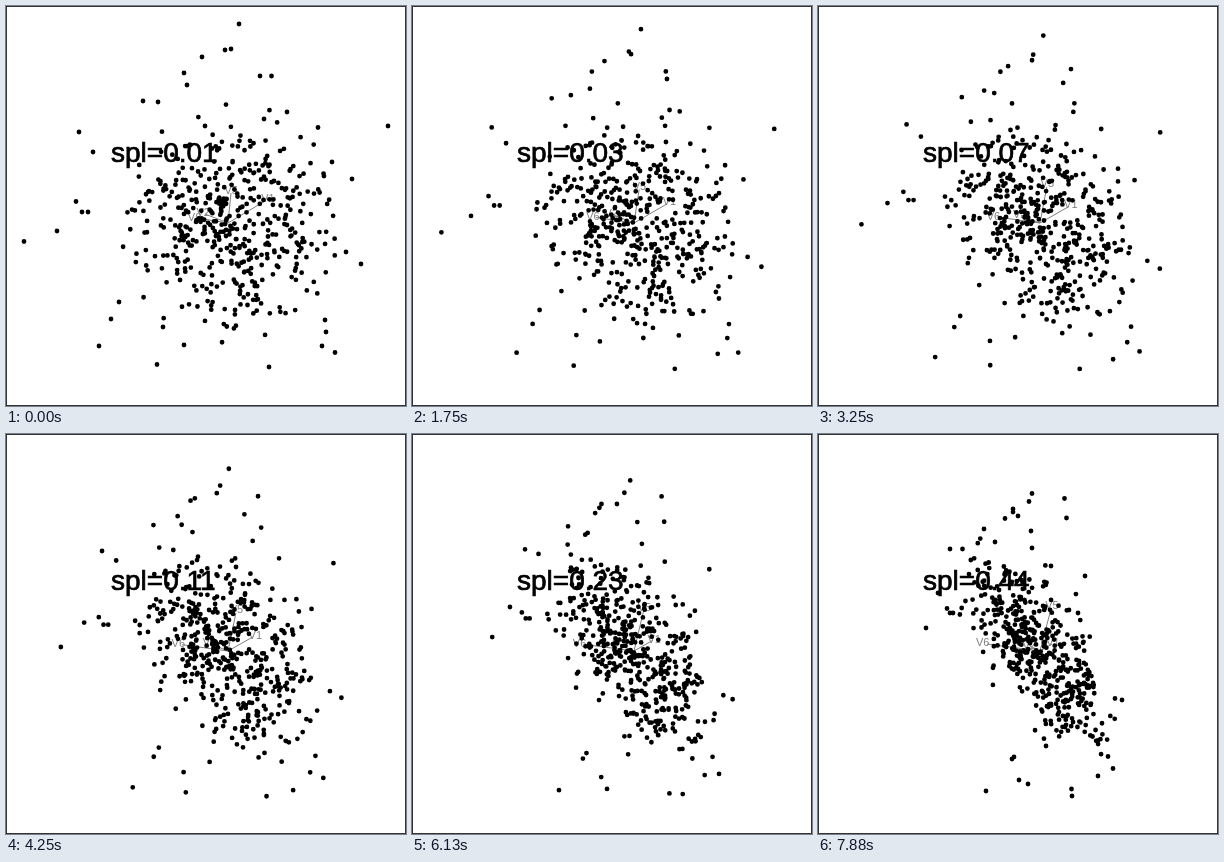
Write an HTML page with a canvas that moves like this. It is 400 by 400 pixels and loops after 8 s.

```html
<!DOCTYPE html>
<html lang="en">
<head>
<meta charset="utf-8">
<title>Projection tour</title>
<style>
html, body { margin: 0; width: 100%; height: 100%; overflow: hidden; background: #fff; }
canvas { display: block; width: 400px; height: 400px; }
</style>
</head>
<body>
<canvas id="stage" width="400" height="400"></canvas>
<script>
const ctx = document.getElementById('stage').getContext('2d');
const LOOP = 8000, STEP = 125, LAST = 63;
const CX = 222, CY = 217;
const TURN_X = 0.75, TURN_Y = 0.5;

// Outlying points: start x, y, end x, y.
const outer = [
  [233, 18, 214, 59.5], [382, 120, 267, 142], [18, 235.5, 108, 194],
  [73, 126, 132, 115], [87, 146, 144.5, 115], [51, 225, 120, 159],
  [70, 195.5, 129, 174.5], [76, 206, 132, 179], [82, 206, 135, 179],
  [93, 340, 168, 357], [151, 358.5, 210, 350], [105, 313, 194, 325],
  [113, 296, 196, 323], [196, 51, 187, 84.5], [178, 67, 195, 75],
  [181, 79, 177, 108], [219, 44, 211, 67.5], [225, 43, 200, 82],
  [254, 70, 246.5, 64.5], [265.5, 70, 213, 97], [137, 95, 166, 95],
  [152, 96, 195, 78], [281, 106, 214, 114], [258, 113, 248.5, 84],
  [312, 121.5, 233, 132], [326, 156, 251, 176], [346, 173, 260, 179],
  [355, 258, 304, 266], [340, 246, 297, 264.5], [329, 346.5, 295, 334.5],
  [316, 340, 254, 362], [263, 361, 253.5, 355], [320, 326, 280, 342],
  [319, 314, 290, 322.5], [178, 339, 228, 312], [157, 321, 201, 346]
];

const axes = [
  ['V5', 225, 187, 233, 175],
  ['V1', 259, 195, 234, 210],
  ['V6', 191, 212, 169, 210],
  ['V2', 199, 208, 212, 212]
];

// Step index and value of the index shown.
const scores = [[0, 0.01], [14, 0.03], [26, 0.07], [34, 0.11], [42, 0.15], [56, 0.32], [63, 0.44]];

let seed = 20;
function rand() {
  seed = (seed * 1664525 + 1013904223) % 4294967296;
  return (seed + 0.5) / 4294967296;
}
function gauss() {
  return Math.sqrt(-2 * Math.log(rand())) * Math.cos(2 * Math.PI * rand());
}

function makeCore(count) {
  const list = [];
  while (list.length < count) {
    const x = gauss() * 51, y = gauss() * 52;
    if ((x / 112) ** 2 + (y / 122) ** 2 > 1) continue;
    const x1 = 0.5 * x + 0.35 * y + gauss() * 14;
    const y1 = 0.25 * x + 0.85 * y + gauss() * 12;
    list.push([226 + x, 218 + y, 222 + x1, 218 + y1]);
  }
  return list;
}

const points = outer.concat(makeCore(464));

function turn(a, b, mid, angle, s) {
  return mid + ((a - mid) * Math.sin(angle * (1 - s)) + (b - mid) * Math.sin(angle * s)) / Math.sin(angle);
}

function place([x0, y0, x1, y1], s) {
  return [turn(x0, x1, CX, TURN_X, s), turn(y0, y1, CY, TURN_Y, s)];
}

function scoreAt(k) {
  let i = 1;
  while (scores[i][0] < k) i++;
  const [k0, v0] = scores[i - 1], [k1, v1] = scores[i];
  return v0 + (v1 - v0) * (k - k0) / (k1 - k0);
}

function drawAxes(s) {
  ctx.strokeStyle = ctx.fillStyle = '#7f7f7f';
  ctx.lineWidth = 1;
  ctx.font = '11px "Liberation Sans", Arial, sans-serif';
  ctx.textAlign = 'center';
  ctx.textBaseline = 'middle';
  for (const [name, ...ends] of axes) {
    const [x, y] = place(ends, s);
    ctx.beginPath();
    ctx.moveTo(CX, CY);
    ctx.lineTo(x, y);
    ctx.stroke();
    ctx.fillText(name, CX + (x - CX) * 1.08, CY + (y - CY) * 1.08);
  }
}

function drawPoints(s) {
  ctx.fillStyle = '#000';
  ctx.beginPath();
  for (const p of points) {
    const [x, y] = place(p, s);
    ctx.moveTo(x + 2.4, y);
    ctx.arc(x, y, 2.4, 0, 2 * Math.PI);
  }
  ctx.fill();
}

function drawScore(k) {
  const text = 'spl=' + scoreAt(k).toFixed(2);
  ctx.font = '28px "Liberation Sans", Arial, sans-serif';
  ctx.textAlign = 'left';
  ctx.textBaseline = 'alphabetic';
  ctx.fillStyle = ctx.strokeStyle = '#000';
  ctx.lineWidth = 0.7;
  ctx.fillText(text, 105, 156);
  ctx.strokeText(text, 105, 156);
}

function draw(time) {
  const k = Math.min(LAST, Math.floor((time % LOOP) / STEP));
  const s = k / LAST;
  ctx.fillStyle = '#fff';
  ctx.fillRect(0, 0, 400, 400);
  drawAxes(s);
  drawPoints(s);
  drawScore(k);
  ctx.strokeStyle = '#333';
  ctx.lineWidth = 1;
  ctx.strokeRect(0.5, 0.5, 399, 399);
}

const start = performance.now();
function tick() {
  draw(performance.now() - start);
  requestAnimationFrame(tick);
}
tick();
</script>
</body>
</html>
```
